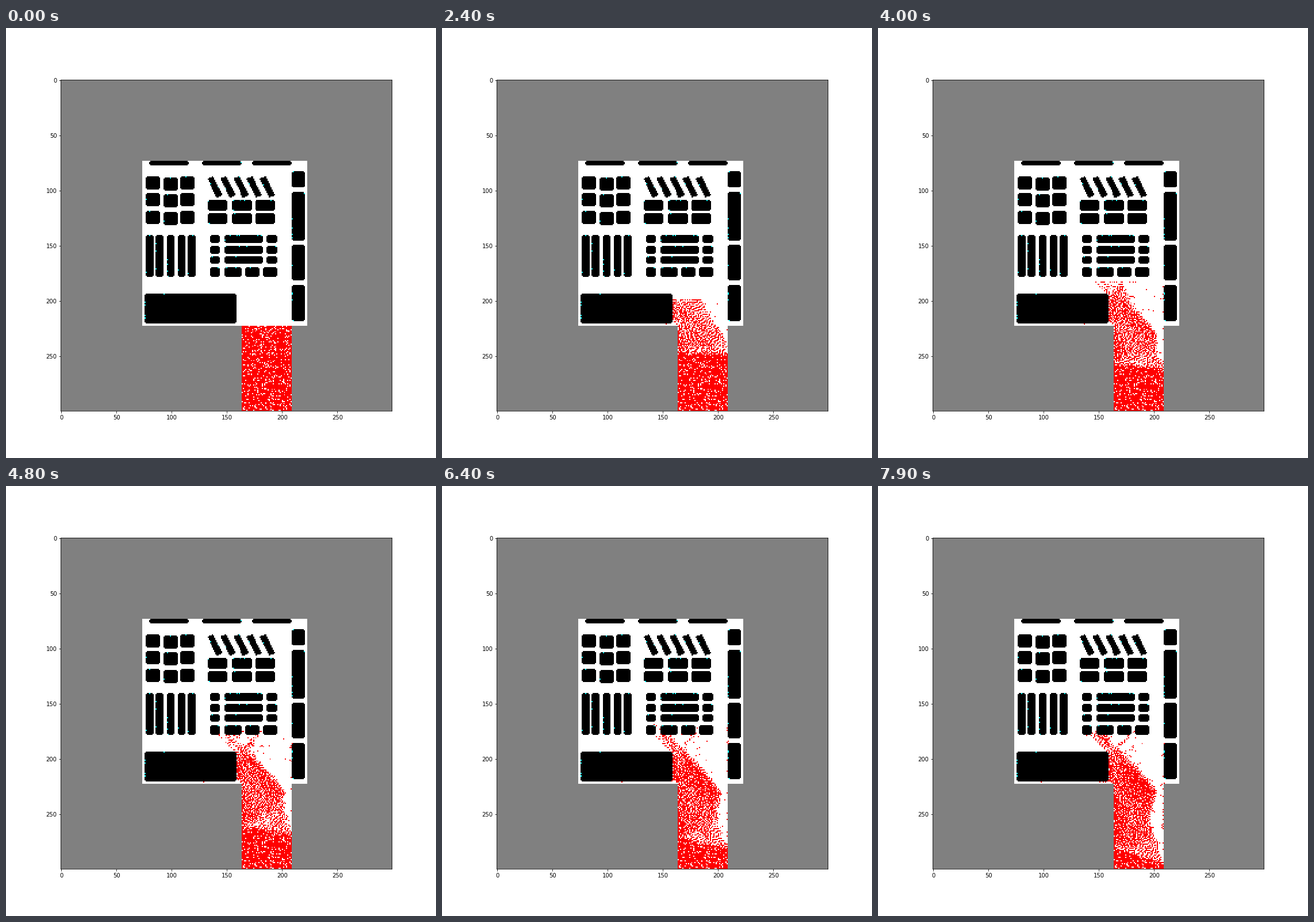
Recreate the animation shown at these times as a matplotlib script. Size 748x748 px, loop 8 s.

```python
from itertools import product

import matplotlib.pyplot as plt
import numpy as np
from matplotlib.animation import FuncAnimation
from matplotlib.path import Path

SIZE, STEPS = 300, 80
TOP, END = 74, 223              # built-up square, both axes
ROAD_L, ROAD_R = 164, 209       # columns of the approach road
GREY, WHITE, BLACK = (128,) * 3, (255,) * 3, (0,) * 3
CYAN, RED = (0, 255, 255), (255, 0, 0)

rng = np.random.default_rng(7)


def add_block(img, x, y, w, h):
    """Black rectangle with its corner cells left out."""
    x, y = round(x), round(y)
    img[y:y + h, x:x + w] = BLACK
    for cy, cx in product((y, y + h - 1), (x, x + w - 1)):
        img[cy, cx] = WHITE


def add_slanted(img, x):
    bar = [(x, 89.8), (x + 5.5, 88), (x + 14, 105), (x + 8.5, 107.2)]
    yy, xx = np.mgrid[:SIZE, :SIZE]
    centres = np.column_stack([xx.ravel(), yy.ravel()]) + 0.5
    img[Path(bar).contains_points(centres).reshape(SIZE, SIZE)] = BLACK


def build_map():
    img = np.full((SIZE, SIZE, 3), GREY, np.uint8)
    img[TOP:END, TOP:END] = WHITE
    img[END:, ROAD_L:ROAD_R] = WHITE
    for x in (80, 128, 173):
        add_block(img, x, TOP, 36, 4)
    for y, h in ((83, 15), (102, 44), (150, 32), (186, 33)):
        add_block(img, 209, y, 12, h)
    for i, j in product(range(3), repeat=2):
        add_block(img, 77 + 15.6 * i, 88 + 15.4 * j + (i == 1), 13, 12)
    for i, j in product(range(3), range(2)):
        add_block(img, 133 + 21.6 * i, 109 + 12 * j, 18, 10)
    for i in range(5):
        add_block(img, 76.8 + 9.6 * i, 141, 7, 38)
        add_slanted(img, 132.7 + 11.8 * i)
    for (x, w), j in product(((135, 9), (148, 35), (186, 10)), range(3)):
        add_block(img, x, 141 + 9.6 * j, w, 7)
    for x, w in ((135, 9), (148, 16), (167, 13), (183, 13)):
        add_block(img, x, 170, w, 9)
    add_block(img, 76, 194, 83, 27)

    free = (img == 255).all(axis=2)
    solid = (img == 0).all(axis=2)
    # Doors sit on upper and left-hand walls
    wall = solid & (np.roll(free, 1, axis=0) | np.roll(free, 1, axis=1))
    spots = np.argwhere(wall)
    doors = spots[rng.choice(len(spots), 66, replace=False)]
    img[tuple(doors.T)] = CYAN
    return img, free, solid, doors


def spread(mask):
    """Grow a mask by one cell in all eight directions."""
    tall = mask.copy()
    tall[..., 1:, :] |= mask[..., :-1, :]
    tall[..., :-1, :] |= mask[..., 1:, :]
    wide = tall.copy()
    wide[..., 1:] |= tall[..., :-1]
    wide[..., :-1] |= tall[..., 1:]
    return wide


def distance_fields(free, gy, gx):
    """Step count to each goal, with straight distance as tie-break."""
    h, w = free.shape
    seen = np.zeros((len(gy), h, w), bool)
    seen[np.arange(len(gy)), gy, gx] = True
    allowed = free | seen
    dist = np.zeros(seen.shape, np.uint16)
    for _ in range(260):
        dist += ~seen
        seen = spread(seen) & allowed
    yy, xx = np.mgrid[:h, :w]
    air = np.hypot(xx - gx[:, None, None], yy - gy[:, None, None])
    return (dist + 0.001 * air).astype(np.float32)


def simulate(free, solid, doors):
    """Cells taken by walkers at each step, as (rows, columns)."""
    free, solid = free[TOP:, TOP:END], solid[TOP:, TOP:END]
    h, w = free.shape
    gy, gx = doors[doors[:, 0] < 190].T - TOP
    field = distance_fields(free, gy, gx)
    porch = spread(solid)
    porch[182 - TOP:] = False

    y, x = np.nonzero(free & (rng.random(free.shape) < 0.87))
    queued = y >= END - TOP
    y, x = y[queued], x[queued]
    weight = 0.06 + np.exp(-((gx + TOP - 150) / 40) ** 2)
    goal = rng.choice(len(gy), len(x), p=weight / weight.sum())
    moves = np.array([(-1, -1), (-1, 0), (-1, 1), (0, -1), (0, 1)])

    states = []
    for t in range(STEPS):
        states.append((y + TOP, x + TOP))
        # The queue loosens from the front, faster on the right
        lean = 0.63 + 0.23 * (x + TOP - ROAD_L) / (ROAD_R - ROAD_L)
        edge = 225 + min(t, 16) + lean * max(t - 16, 0)
        edge = edge + rng.normal(0, 1.2, len(x)) * (t > 16)
        waiting = rng.permutation(np.nonzero(y + TOP < edge)[0])
        taken = ~free
        taken[y, x] = True
        for _ in range(2):
            ny = np.clip(y[waiting, None] + moves[:, 0], 0, h - 1)
            nx = np.clip(x[waiting, None] + moves[:, 1], 0, w - 1)
            g = goal[waiting]
            cost = field[g[:, None], ny, nx] + 1e4 * taken[ny, nx]
            pick = cost.argmin(axis=1)
            row = np.arange(len(waiting))
            fits = cost[row, pick] < field[g, y[waiting], x[waiting]] + 0.5
            cell = ny[row, pick] * w + nx[row, pick]
            able = np.nonzero(fits)[0]
            win = able[np.unique(cell[able], return_index=True)[1]]
            who = waiting[win]
            y[who], x[who] = np.divmod(cell[win], w)
            taken[y[who], x[who]] = True
            waiting = np.delete(waiting, win)
        # Walkers vanish at their door, or now and then at any wall
        inside = field[goal, y, x] < 1.5
        inside |= porch[y, x] & (rng.random(len(x)) < 0.25)
        y, x, goal = y[~inside], x[~inside], goal[~inside]
    return states


base, free, solid, doors = build_map()
states = simulate(free, solid, doors)

fig, ax = plt.subplots(figsize=(10.39, 10.39), dpi=72)
view = ax.imshow(base, interpolation="nearest")


def draw(t):
    img = base.copy()
    img[states[t]] = RED
    # Stragglers in the alley below the hall
    for lag in (0, 53, 56, 58):
        col = 177 - t + lag
        if col < 159:
            img[221, col] = RED
    view.set_data(img)
    return [view]


anim = FuncAnimation(fig, draw, frames=STEPS, interval=100, repeat=True,
                     repeat_delay=0, blit=False)
plt.show()
```
